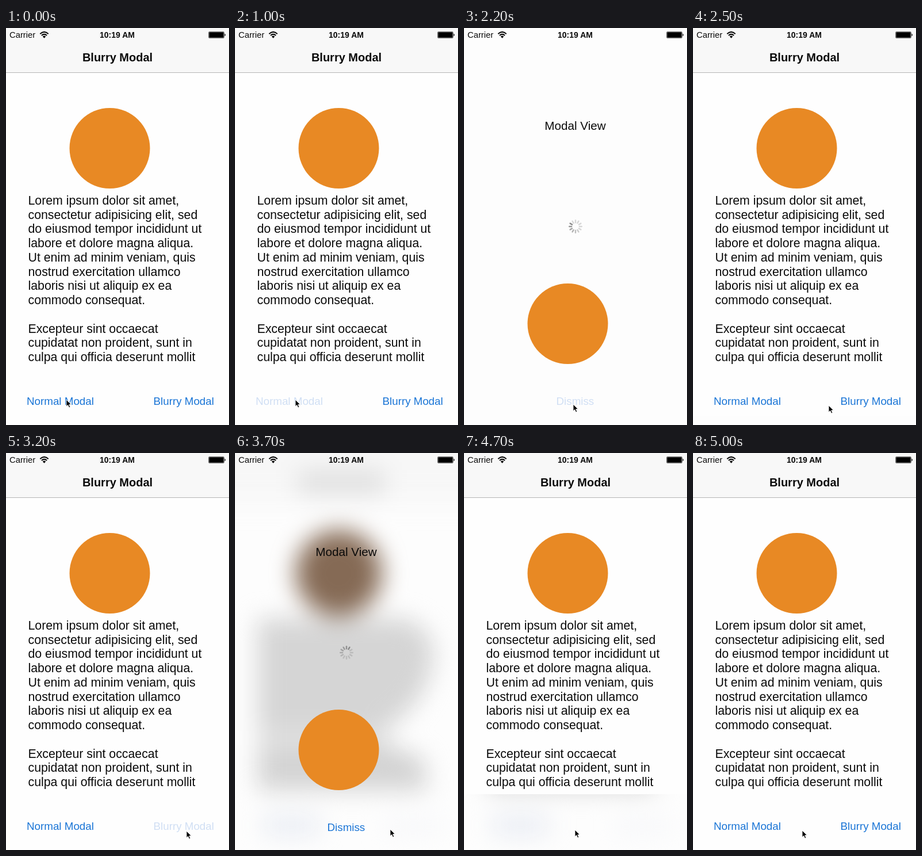
These frames come from a looping animation (388 by 690 pixels, 5100 ms). An HTML page:

```html
<!DOCTYPE html>
<html lang="en">
<head>
<meta charset="utf-8">
<title>Blurry Modal</title>
<style>
  html, body { margin: 0; width: 100%; height: 100%; overflow: hidden; background: #fff; }
  svg { display: block; width: 388px; height: 690px; }
  text { font-family: "Liberation Sans", Arial, sans-serif; fill: #0a0a0a; }
  .title { font-size: 20px; font-weight: bold; text-anchor: middle; }
  .body { font-size: 21.3px; }
  .heading { font-size: 20.7px; text-anchor: middle; }
  .button { font-size: 18.8px; fill: #1a75d6; }
  .button.pressed { fill: #d0dff4; }
</style>
</head>
<body>
<svg viewBox="0 0 388 690">
  <defs>
    <clipPath id="reveal"><rect id="revealBox" width="388" height="690"/></clipPath>
    <filter id="soft" filterUnits="userSpaceOnUse" x="-80" y="-80" width="550" height="850" color-interpolation-filters="sRGB">
      <feGaussianBlur stdDeviation="21"/>
    </filter>
  </defs>

  <g id="page">
    <rect width="388" height="690" fill="#fefefe"/>
    <rect width="388" height="77" fill="#f8f8f8"/>
    <rect y="77" width="388" height="1" fill="#b5b5b5"/>
    <text class="title" x="194" y="58">Blurry Modal</text>
    <circle cx="180.5" cy="209" r="70" fill="#e88924"/>
    <g id="copy"></g>
    <text id="normal" class="button" x="36" y="655">Normal Modal</text>
    <text id="blurry" class="button" x="256.5" y="655">Blurry Modal</text>
  </g>

  <g id="plain" clip-path="url(#reveal)">
    <rect width="388" height="690" fill="#fdfdfd"/>
  </g>

  <g id="frosted" clip-path="url(#reveal)">
    <rect width="388" height="690" fill="#fdfdfd"/>
    <g filter="url(#soft)">
      <rect x="-80" y="-80" width="550" height="165" fill="#f7f7f7"/>
      <rect x="110" y="30" width="150" height="42" fill="#dfdfdf"/>
      <path fill="#d5d5d5" d="M40 288H302L340 318L346 362L328 415L298 452L262 480H40Z"/>
      <path fill="#e2e2e2" d="M40 480H262L275 512H40Z"/>
      <path fill="#d3d3d3" d="M40 512H275L328 530L334 586H40Z"/>
      <circle cx="180.5" cy="209" r="75" fill="#856a55"/>
      <rect x="50" y="632" width="96" height="30" fill="#e6eaf2"/>
      <rect x="262" y="640" width="96" height="18" fill="#f5f6fa"/>
    </g>
  </g>

  <g id="modal">
    <text class="heading" x="193.5" y="177">Modal View</text>
    <g id="spinner" transform="translate(194 345)"></g>
    <circle cx="180.5" cy="514" r="70" fill="#e88924"/>
    <text id="dismiss" class="button" x="160.5" y="655">Dismiss</text>
  </g>

  <g id="status">
    <text x="6" y="17" font-size="14.8">Carrier</text>
    <g fill="none" stroke="#0a0a0a" stroke-width="2.1">
      <path d="M59.3 10.2Q66.5 3.6 73.7 10.2"/>
      <path d="M61.9 13Q66.5 8.8 71.1 13"/>
    </g>
    <path d="M63.8 14.8Q66.5 12.4 69.2 14.8L66.5 17.8Z"/>
    <text x="193.5" y="17" font-size="14" font-weight="bold" text-anchor="middle">10:19 AM</text>
    <rect x="352.5" y="6.5" width="27" height="11" rx="1.5" fill="#fff" stroke="#777"/>
    <rect x="353.3" y="7.3" width="25.4" height="9.4" rx=".5"/>
    <path d="M380.5 9.5Q383.5 12 380.5 14.5Z"/>
  </g>

  <path id="cursor" d="M0 0V11.8L2.7 9.3L4.7 13.7L6.8 12.8L4.8 8.5H8.5Z" fill="#000" stroke="#fff" stroke-width=".9"/>
</svg>

<script>
const LOOP = 5100, STEP = 100, HEIGHT = 690;
const SPRING = 23;   // per second
const visits = [
  { open: 1050, close: 2250, layer: "plain" },
  { open: 3350, close: 4550, layer: "frosted" },
];
const presses = {
  normal: [[1000, 1200]],
  blurry: [[3200, 3400]],
  dismiss: [[2200, 2500], [4500, 4800]],
};
// time, x, y
const cursorPath = [
  [0, 105, 646], [1100, 105, 646], [1400, 142, 646], [1500, 155, 649],
  [2000, 190, 654], [2300, 190, 654], [2700, 282, 658], [3000, 314, 657],
  [3300, 314, 657], [3700, 270, 654], [4100, 206, 653], [4300, 199, 653],
  [4500, 199, 653], [4800, 190, 656], [5100, 190, 656],
];
const lines = [
  "Lorem ipsum dolor sit amet,", "consectetur adipisicing elit, sed",
  "do eiusmod tempor incididunt ut", "labore et dolore magna aliqua.",
  "Ut enim ad minim veniam, quis", "nostrud exercitation ullamco",
  "laboris nisi ut aliquip ex ea", "commodo consequat.", "",
  "Excepteur sint occaecat", "cupidatat non proident, sunt in",
  "culpa qui officia deserunt mollit",
];

const $ = id => document.getElementById(id);

function add(parent, tag, attrs, text = "") {
  const el = document.createElementNS("http://www.w3.org/2000/svg", tag);
  for (const key in attrs) el.setAttribute(key, attrs[key]);
  el.textContent = text;
  parent.append(el);
  return el;
}

lines.forEach((line, i) =>
  add($("copy"), "text", { class: "body", x: 38.5, y: 307 + i * 24.74 }, line));

const rods = Array.from({ length: 12 }, (_, i) =>
  add($("spinner"), "rect", {
    x: -1.2, y: -12, width: 2.4, height: 6.4, rx: 1.2,
    fill: "#808080", transform: `rotate(${i * 30})`,
  }));

// Share of a critically damped move still to go
function remaining(ms) {
  const p = SPRING * Math.max(0, ms) / 1000;
  return (1 + p) * Math.exp(-p);
}

function modalTop(visit, t) {
  const top = t < visit.close
    ? remaining(t - visit.open)
    : 1 - remaining(t - visit.close);
  return Math.round(top * HEIGHT);
}

function cursorAt(t) {
  const i = cursorPath.findIndex(p => p[0] > t);
  const [t0, x0, y0] = cursorPath[i - 1], [t1, x1, y1] = cursorPath[i];
  const k = (t - t0) / (t1 - t0);
  return [x0 + (x1 - x0) * k, y0 + (y1 - y0) * k];
}

function spin(ms) {
  const head = Math.floor(ms * 12 / 1000 - 3);
  rods.forEach((rod, i) => {
    const age = (((head - i) % 12) + 12) % 12;
    rod.setAttribute("opacity", Math.max(.3, 0.9 - age * .1));
  });
}

function draw(t) {
  const visit = visits.find(v => t >= v.open && t < v.close + 450);
  for (const v of visits) $(v.layer).style.display = v === visit ? "" : "none";
  $("modal").style.display = visit ? "" : "none";
  if (visit) {
    const top = modalTop(visit, t);
    $("revealBox").setAttribute("y", top);
    $("modal").setAttribute("transform", `translate(0 ${top})`);
    spin(t - visit.open);
  }
  for (const id in presses) {
    const down = presses[id].some(([from, to]) => t >= from && t < to);
    $(id).classList.toggle("pressed", down);
  }
  $("cursor").setAttribute("transform", `translate(${cursorAt(t)})`);
}

const start = performance.now();
function tick() {
  const t = (performance.now() - start) % LOOP;
  draw(Math.floor(t / STEP) * STEP);
  requestAnimationFrame(tick);
}
tick();
</script>
</body>
</html>
```
